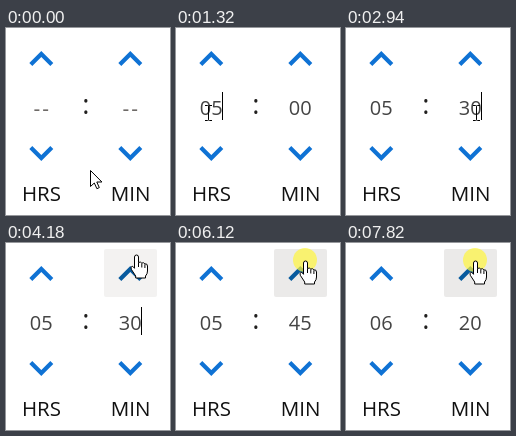
Recreate the animation shown at these times as an HTML page with a canvas. Size 164x187 px, loop 8000 ms.

```html
<!DOCTYPE html>
<html lang="en">
<head>
<meta charset="utf-8">
<title>Time picker</title>
<style>
html, body { margin: 0; width: 100%; height: 100%; overflow: hidden; background: #fff; }
canvas { display: block; width: 164px; height: 187px; }
</style>
</head>
<body>
<canvas id="stage" width="164" height="187"></canvas>
<script>
const ctx = document.getElementById('stage').getContext('2d');
const LOOP = 8000, STEP = 76;
const HRS = 35.3, MIN = 124.3;
const BLUE = '#0f72d4', DARK_BLUE = '#075a9e';

// Moments of the interaction, in ms
const FOCUS_HRS = 620, TYPE_HRS = 1320, FOCUS_MIN = 1930, TYPE_MIN = 2940;
const HOVER = 4030, BLUR = 4500, PRESS = 4580, COUNT = 4650;

const ARROW = new Path2D('M0 0V16L3.8 12.5L6.4 18.2L8.8 17.1L6.3 11.5H11.4Z');
const BEAM = new Path2D('M-3.5-7.5H-1Q0-7.5 0-6.5Q0-7.5 1-7.5H3.5M0-6.5V6.5M-3.5 7.5H-1Q0 7.5 0 6.5Q0 7.5 1 7.5H3.5');
const HAND = new Path2D('M-2 2.5A2 2 0 0 1 2 2.5V8Q4 6.8 5.3 8.6Q7.3 7.5 8.4 9.4Q10.8 8.8 11 11.5V16.5Q11 19.5 9 21.5V23.5H-.8V21.5L-5.2 14.8Q-6.2 12.2-4.3 11.8Q-3.3 11.8-2 13.8Z');
const KNUCKLES = new Path2D('M2 8V12.5M5.3 9V13M8.4 9.8V13.5');

const GLIDES = [
  { from: 70, to: 300, x: 32, y: 68 },
  { from: 450, to: 450, x: 32, y: 85 },
  { from: 1390, to: FOCUS_MIN, x: 130, y: 85, dip: 14 },
  { from: 3950, to: 4180, x: 130, y: 11 },
  { from: BLUR, to: BLUR, x: 129, y: 17 }
];

// The pointer is sampled in steps, eased along each glide.
function pointerAt(t) {
  let x = 84, y = 142;
  for (const g of GLIDES) {
    if (t < g.from) break;
    const steps = Math.round((g.to - g.from) / STEP) + 1;
    const p = Math.min(1, (Math.floor((t - g.from) / STEP) + 1) / steps);
    const e = p * p * (3 - 2 * p);
    x += (g.x - x) * e;
    y += (g.y - y) * e + (g.dip || 0) * 4 * e * (1 - e);
  }
  return [x, y];
}

// Held button: five ticks per burst, by one at first, then to multiples of five.
function minutesAt(t) {
  if (t < TYPE_HRS) return null;
  if (t < TYPE_MIN) return 300;
  if (t < COUNT) return 330;
  const held = t - COUNT, burst = 1240;
  const ticks = 5 * Math.floor(held / burst) + Math.min(4, Math.floor(held % burst / 230)) + 1;
  return 330 + Math.max(ticks, 5 * (ticks - 4));
}

function drawCaret(t) {
  if (t < FOCUS_HRS || t >= BLUR) return;
  const [since, x] = t < TYPE_HRS ? [FOCUS_HRS, 35]
    : t < FOCUS_MIN ? [TYPE_HRS, 46]
    : t < TYPE_MIN ? [FOCUS_MIN, 123] : [TYPE_MIN, 135];
  if ((t - since) % 1010 >= 500) return;
  ctx.fillStyle = '#000';
  ctx.fillRect(x, 64, 1, 28);
}

function drawClick(t, from, to, x, y) {
  if (t < from || t >= to) return;
  ctx.fillStyle = 'rgba(255, 245, 60, 0.7)';
  ctx.beginPath();
  ctx.arc(x, y, 12, 0, 2 * Math.PI);
  ctx.fill();
}

function label(str, x, y, size, color) {
  ctx.font = `${size}px "Open Sans", "Noto Sans", sans-serif`;
  ctx.fillStyle = color;
  ctx.fillText(str, x, y);
}

function chevron(x, y, dir, color) {
  ctx.beginPath();
  ctx.moveTo(x - 10.5, y + 5.5 * dir);
  ctx.lineTo(x, y - 5 * dir);
  ctx.lineTo(x + 10.5, y + 5.5 * dir);
  ctx.strokeStyle = color;
  ctx.lineWidth = 4.2;
  ctx.stroke();
}

function drawValue(value, x) {
  if (value !== null) return label(String(value).padStart(2, '0'), x, 87, 20, '#444');
  ctx.letterSpacing = '2px';
  label('--', x + 1, 87.5, 21, '#6e6a67');
  ctx.letterSpacing = '0px';
}

function drawPointer(x, y) {
  const inColumn = Math.abs(x - HRS) < 27 || Math.abs(x - MIN) < 27;
  const overField = inColumn && y > 58 && y < 100;
  const overButton = inColumn && (y < 55 || (y > 101 && y < 149));
  ctx.save();
  ctx.translate(Math.floor(x) + 0.5, Math.floor(y) + (overField ? 0 : 0.5));
  ctx.strokeStyle = '#000';
  ctx.lineWidth = 1;
  if (overField) {
    ctx.stroke(BEAM);
  } else {
    const shape = overButton ? HAND : ARROW;
    ctx.fillStyle = '#fff';
    ctx.fill(shape);
    ctx.stroke(shape);
    if (overButton) ctx.stroke(KNUCKLES);
  }
  ctx.restore();
}

function draw(t) {
  const minutes = minutesAt(t), hover = t >= HOVER;

  ctx.fillStyle = '#fff';
  ctx.fillRect(0, 0, 164, 187);
  if (hover) {
    ctx.fillStyle = t >= PRESS ? '#ebeae9' : '#f3f2f1';
    ctx.beginPath();
    ctx.roundRect(98, 6, 53, 48, 2);
    ctx.fill();
  }

  ctx.textAlign = 'center';
  for (const x of [HRS, MIN]) {
    chevron(x, 31, 1, hover && x === MIN ? DARK_BLUE : BLUE);
    chevron(x, 125, -1, BLUE);
  }
  drawValue(minutes && Math.floor(minutes / 60), HRS);
  drawValue(minutes && minutes % 60, MIN);
  label(':', 79.8, 85.5, 27, '#201f1e');
  label('HRS', 35.5, 173, 20.5, '#111');
  label('MIN', 124.5, 173, 20.5, '#111');

  drawCaret(t);
  drawClick(t, FOCUS_HRS, 770, 30, 83);
  drawClick(t, FOCUS_MIN, 2010, 128.5, 82.5);
  drawClick(t, PRESS, LOOP, 129, 17);
  drawPointer(...pointerAt(t));
}

const start = performance.now();
function tick() {
  draw((performance.now() - start) % LOOP);
  requestAnimationFrame(tick);
}
tick();
</script>
</body>
</html>
```
